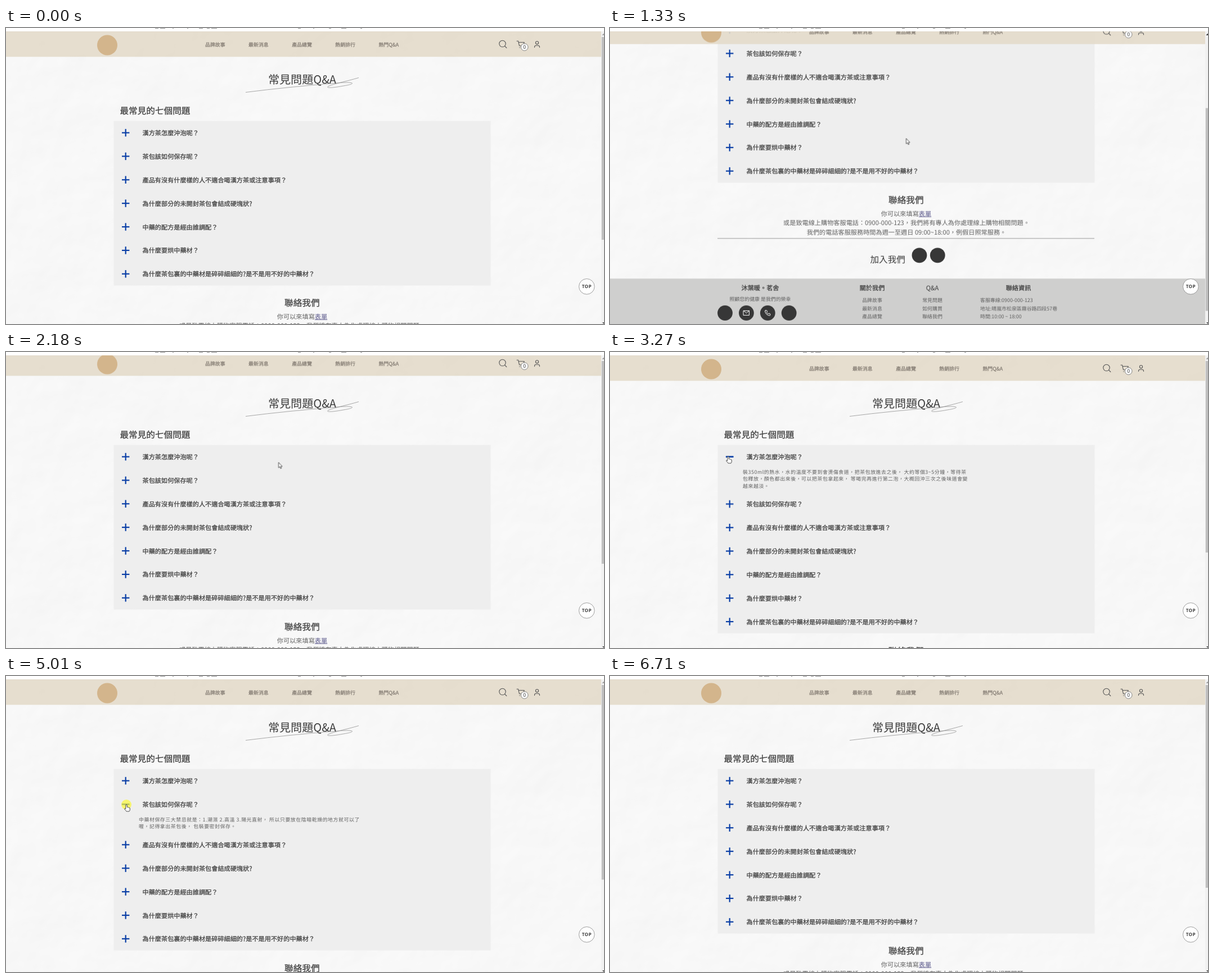
Recreate the animation shown at these times as an HTML page. Size 1063x527 px, loop 6780 ms.

```html
<!DOCTYPE html>
<html lang="zh-Hant">
<head>
<meta charset="utf-8">
<title>Q&amp;A</title>
<style>
html, body { margin: 0; width: 100%; height: 100%; overflow: hidden; background: #f7f7f7; }
svg { position: absolute; left: 0; top: 0; width: 1063px; height: 527px; }
#paper { will-change: transform; }
text {
  font-family: "Noto Sans CJK TC", "Noto Sans TC", "Noto Sans CJK JP", "Noto Sans CJK", sans-serif;
  fill: #3c3c3c; text-rendering: geometricPrecision;
}
.mid { text-anchor: middle; }
.med { stroke: #3c3c3c; stroke-width: .25px; }
.light { font-weight: 300; fill: #626262; }
.nav { fill: #857d74; stroke: #857d74; stroke-width: .25px; }
.answer text { letter-spacing: .558px; fill: #626262; }
.link { fill: #5c5a8c; text-decoration: underline; }
.top { font-family: "Open Sans", "Noto Sans", sans-serif; font-weight: 700; letter-spacing: .3px; }
.line { fill: none; stroke: #555; stroke-width: 1.1; stroke-linecap: round; stroke-linejoin: round; }
.white { stroke: #fff; stroke-width: 1; }
.bar { fill: #0b3fa6; transform-box: fill-box; transform-origin: center; }

#scroll, #head, #cursor, #arrow, #hand, #spot, #thumb, #up, #panel,
#after1, #after2, .answer, .v1, .v2 { animation: 6780ms linear infinite; }

#scroll { animation-name: scroll; }
@keyframes scroll {
  0%, 14.6% { transform: translateY(0); }
  16.2% { transform: translateY(-52px); }
  17.9% { transform: translateY(-125px); }
  19.62% { transform: translateY(-183px); }
  21.4%, 29.65% { transform: translateY(-205.5px); }
  30.7% { transform: translateY(-70px); }
  31.8%, 100% { transform: translateY(0); }
}
#head { animation-name: head; }
@keyframes head {
  0%, 17.2% { transform: translateY(0); }
  19.62% { transform: translateY(-22.5px); }
  23.6%, 29.8% { transform: translateY(-46px); }
  32.15% { transform: translateY(-9px); }
  33.5%, 100% { transform: translateY(0); }
}
#thumb { animation-name: thumb; }
@keyframes thumb {
  0%, 14.6% { y: 16px; height: 361px; }
  16.2% { y: 52px; }
  17.9% { y: 102.5px; }
  19.62% { y: 142.5px; }
  21.4%, 29.65% { y: 158px; }
  30.7% { y: 64px; }
  31.8% { y: 16px; }
  43.2% { y: 16px; height: 361px; }
  47.05%, 53.8% { y: 16px; height: 341px; }
  57.37%, 66.4% { y: 16px; height: 361px; }
  70.06%, 74.9% { y: 16px; height: 346.5px; }
  78.6%, 100% { y: 16px; height: 361px; }
}
#up { animation-name: up; animation-timing-function: step-end; }
@keyframes up {
  0%, 31.8%, 100% { fill: #a3a3a3; }
  14.8% { fill: #404040; }
}
#panel { animation-name: panel; }
@keyframes panel {
  0%, 43.2%, 57.37%, 66.4%, 78.6%, 100% { height: 293px; }
  47.05%, 53.8% { height: 335.3px; }
  70.06%, 74.9% { height: 323.1px; }
}
#after1 { animation-name: after1; }
@keyframes after1 {
  0%, 43.2%, 57.37%, 100% { transform: translateY(0); }
  47.05%, 53.8% { transform: translateY(42.3px); }
}
#after2 { animation-name: after2; }
@keyframes after2 {
  0%, 66.4%, 78.6%, 100% { transform: translateY(0); }
  70.06%, 74.9% { transform: translateY(30.1px); }
}
#answer1 { animation-name: answer1; }
@keyframes answer1 {
  0%, 43.2%, 57.37%, 100% { clip-path: inset(0 0 100% 0); }
  47.05%, 53.8% { clip-path: inset(0 0 0 0); }
}
#answer2 { animation-name: answer2; }
@keyframes answer2 {
  0%, 66.4%, 78.6%, 100% { clip-path: inset(0 0 100% 0); }
  70.06%, 74.9% { clip-path: inset(0 0 0 0); }
}
.v1 { animation-name: turn1; }
@keyframes turn1 {
  0%, 43.2%, 57.37%, 100% { transform: rotate(0); }
  48.2%, 53.4% { transform: rotate(90deg); }
}
.v2 { animation-name: turn2; }
@keyframes turn2 {
  0%, 66.4%, 78.6%, 100% { transform: rotate(0); }
  71.3%, 74.9% { transform: rotate(90deg); }
}
#cursor { animation-name: cursor; }
@keyframes cursor {
  0%, 1.02% { transform: translate(1044px, 535px); }
  1.03% { transform: translate(1044px, 520px); }
  4.42% { transform: translate(790px, 270px); }
  6.64% { transform: translate(600px, 150px); }
  9%, 14.6% { transform: translate(538px, 178px); }
  19.62% { transform: translate(526.5px, 196.5px); }
  24.04%, 27.43% { transform: translate(525.5px, 201px); }
  28.61%, 29.6% { transform: translate(524.5px, 202px); }
  32.15%, 37.76% { transform: translate(484.5px, 196.5px); }
  40% { transform: translate(320px, 174px); }
  42%, 60.77% { transform: translate(210px, 186px); }
  64.9%, 76% { transform: translate(214px, 229px); }
  78.3% { transform: translate(620px, 350px); }
  80.68%, 84.07% { transform: translate(1046px, 476px); }
  88.5% { transform: translate(1054px, 500px); }
  92.92% { transform: translate(1048px, 523.5px); }
  97.5%, 98.6% { transform: translate(1045px, 524px); }
  98.9%, 100% { transform: translate(1044px, 535px); }
}
#arrow, #hand, #spot { animation-timing-function: step-end; }
#arrow { animation-name: arrow; }
@keyframes arrow {
  0%, 76.6%, 100% { opacity: 1; }
  40.4% { opacity: 0; }
}
#hand { animation-name: hand; }
@keyframes hand {
  0%, 76.6%, 100% { opacity: 0; }
  40.4% { opacity: 1; }
}
#spot { animation-name: spot; }
@keyframes spot {
  0%, 44.2%, 54.9%, 67.5%, 75.9%, 100% { opacity: 0; }
  42.1%, 52.75%, 65.4%, 73.8% { opacity: .72; }
}
</style>
</head>
<body>
<svg id="paper" viewBox="0 0 1063 527">
  <filter id="crumple" x="0" y="0" width="100%" height="100%" color-interpolation-filters="sRGB">
    <feTurbulence type="fractalNoise" baseFrequency=".008" numOctaves="4" seed="8"/>
    <feDiffuseLighting surfaceScale="1.2" diffuseConstant="1" lighting-color="#fff">
      <feDistantLight azimuth="235" elevation="76"/>
    </feDiffuseLighting>
  </filter>
  <rect width="1063" height="527" filter="url(#crumple)"/>
</svg>
<svg id="stage" viewBox="0 0 1063 527"></svg>
<script>
// text sizes of a 1905 px wide page shown at 1063 px
const [S, M, L, XL] = [16, 20, 28, 36].map(px => px * .558);

// y is the optical middle of the line
const text = (x, y, size, str, cls = '') =>
  `<text x="${x}" y="${(y + size * .38).toFixed(2)}" font-size="${size}" class="${cls}">${str}</text>`;
const lines = (x, ys, size, list, cls) =>
  list.map((str, i) => text(x, ys[i], size, str, cls)).join('');
const disc = (x, y) => `<circle cx="${x}" cy="${y}" r="13.4" fill="#373737"/>`;

const questions = [
  '漢方茶怎麼沖泡呢？',
  '茶包該如何保存呢？',
  '產品有沒有什麼樣的人不適合喝漢方茶或注意事項？',
  '為什麼部分的未開封茶包會結成硬塊狀?',
  '中藥的配方是經由誰調配？',
  '為什麼要烘中藥材？',
  '為什麼茶包裏的中藥材是碎碎細細的?是不是用不好的中藥材？'
];
const row = i => {
  const y = 186.5 + i * 41.88;
  return `<rect class="bar" x="206" y="${y - 1.1}" width="13.4" height="2.2"/>
    <rect class="bar v${i + 1}" x="211.6" y="${y - 6.7}" width="2.2" height="13.4"/>
    ${text(242.5, y + .3, M, questions[i], 'med')}`;
};
const answer = (id, y, list) =>
  `<g class="answer" id="answer${id}">${lines(236, [y, y + 12.4, y + 24.8], S, list)}</g>`;

const contact = `
  ${text(526.3, 489.5, L, '聯絡我們', 'mid med')}
  ${text(526.5, 513.3, M, '你可以來填寫<tspan class="link">表單</tspan>', 'mid light')}
  ${text(527, 530.2, M, '或是致電線上購物客服電話：0900-000-123，我們將有專人為你處理線上購物相關問題。', 'mid light')}
  ${text(527, 547, M, '我們的電話客服服務時間為週一至週日 09:00~18:00，例假日照常服務。', 'mid light')}
  <path d="M191 557.8H861" stroke="#999"/>
  ${text(462.5, 594.8, L, '加入我們')}
  ${disc(550, 587.8)}${disc(582.3, 587.8)}`;

const listY = [667.8, 682.3, 696.8];
const footer = `
  <rect y="629.3" width="1058" height="88.4" fill="#cfcfce"/>
  <rect y="717.7" width="1058" height="70" fill="#ececec"/>
  ${text(267, 646, M, '沐葉暖。茗舍', 'mid med')}
  ${text(267, 665.2, S, '照顧您的健康 是我們的榮幸', 'mid light')}
  ${[204.5, 242.4, 280.3, 318.2].map(x => disc(x, 690.5)).join('')}
  <g class="line white">
    <path d="M237.4 686.5h10v8h-10zl5 4.2 5-4.2"/>
    <path transform="translate(281 690.5)" d="M-4.5-4.5h2.2l1 2.6-1.4 1a6 6 0 0 0 2.8 2.8l1-1.4 2.6 1v2.2a1 1 0 0 1-1 1A9 9 0 0 1-5.5-3.5a1 1 0 0 1 1-1z"/>
  </g>
  ${text(466, 646, M, '關於我們', 'mid med')}
  ${text(573, 646, M, 'Q&amp;A', 'mid')}
  ${text(726, 646, M, '聯絡資訊', 'mid med')}
  ${lines(466, listY, S, ['品牌故事', '最新消息', '產品總覽'], 'mid light')}
  ${lines(573, listY, S, ['常見問題', '如何購買', '聯絡我們'], 'mid light')}
  ${lines(658, listY, S, ['客服專線:0900-000-123', '地址:晴嵐市松泉區霧谷路四段57巷', '時間:10:00 ~ 18:00'], 'light')}
  ${text(225, 728, S, '© 2020 沐葉暖。茗舍版權所有', 'light')}
  ${text(586, 728, S, '隱私權說明', 'mid light')}
  ${text(732, 728, S, 'Taiwan', 'mid light')}`;

const page = `<g id="scroll">
  ${text(526.5, 91, XL, '常見問題Q&amp;A', 'mid')}
  <path d="M426 114.5Q500 105 598 97.2C622 96 620 100 600 103C582 106.5 568 107.5 572.5 104C580 100 605 95 627 88.5" fill="none" stroke="#858585" stroke-width=".7"/>
  ${text(202.5, 147.3, L, '最常見的七個問題', 'med')}
  <rect id="panel" x="191.5" y="165.5" width="670" height="293" fill="#eee"/>
  ${row(0)}
  ${answer(1, 213.7, [
    '裝350ml的熱水，水的溫度不要到會燙傷食道，把茶包放進去之後， 大約等個3~5分鐘，等待茶',
    '包釋放，顏色都出來後，可以把茶包拿起來， 等喝完再進行第二泡，大概回沖三次之後味道會變',
    '越來越淡。'])}
  <g id="after1">
    ${row(1)}
    ${answer(2, 255.6, [
      '中藥材保存三大禁忌就是：1.潮濕 2.高溫 3.陽光直射， 所以只要放在陰暗乾燥的地方就可以了',
      '喔，記得拿出茶包後， 包裝要密封保存。'])}
    <g id="after2">${[2, 3, 4, 5, 6].map(row).join('')}${contact}${footer}</g>
  </g>
</g>`;

const menu = ['品牌故事', '最新消息', '產品總覽', '熱銷排行', '熱門Q&amp;A'];
const head = `<g id="head">
  <rect y="6" width="1058" height="45.3" fill="#e4dbca" opacity=".9"/>
  <circle cx="180" cy="30.5" r="18" fill="#d3b58c"/>
  ${menu.map((m, i) => text(354 + i * 77.1, 29.5, S, m, 'nav')).join('')}
  <g class="line">
    <circle cx="882.5" cy="28" r="5.7"/><path d="M886.6 32.2l3.2 3.3"/>
    <path d="M908 23.2h2.5l2 8.5h7l1.7-6.2h-9.8M913 34.5v.6"/>
    <circle cx="944" cy="26.3" r="2.6"/><path d="M939.5 34.5v-.8q0-2.5 2.5-2.5h4q2.5 0 2.5 2.5v.8"/>
  </g>
  <circle cx="921.7" cy="34" r="6.3" fill="#fff" stroke="#666" stroke-width=".8"/>
  ${text(921.7, 34.1, S, '0', 'mid')}
</g>`;

const chrome = `
  <circle cx="1032.3" cy="460.3" r="13.8" fill="#fff" stroke="#858585" stroke-width=".8"/>
  ${text(1032.3, 460.3, 8.2, 'TOP', 'mid top')}
  <rect x="1058" y="6" width="5" height="521" fill="#f1f1f1"/>
  <rect id="thumb" x="1058.8" y="16" width="4.2" height="361" fill="#bfbfbf"/>
  <path id="up" d="M1059.5 13l2.5-3h1v3z"/>
  <path d="M1060 524h3v2.5h-.8z" fill="#505050"/>
  <rect width="1063" height="6" fill="#fff"/>
  <path d="M265 .3h6m3 0h9m13 0h2m24 0h2m19 0h7m7 0h5m3 0h10m144 0h5m22 0h2m26 0h4m18 0h9m25 0h3" stroke="#777"/>`;

const cursor = `<g id="cursor">
  <circle id="spot" r="9" fill="#fbf83c"/>
  <g fill="#fff" stroke="#222" stroke-width=".8" stroke-linejoin="round">
    <path id="arrow" d="M0 0V9.6L2.2 7.7 3.7 11 5.2 10.3 3.8 7.2H6.6Z"/>
    <path id="hand" d="M-1.2 1Q-1.2 0 0 0T1.2 1V4.6Q2.6 4 3.4 5Q4.6 4.5 5 5.6Q6.4 5.4 6.3 7V9Q6.3 10.5 5 12H0Q-1 10.5-3.6 7.6Q-3.6 6-1.2 7.6Z"/>
  </g>
</g>`;

document.getElementById('stage').innerHTML =
  page + '<path d="M0 6.5H1058" stroke="#dedede"/>' + head + chrome + cursor;
</script>
</body>
</html>
```
